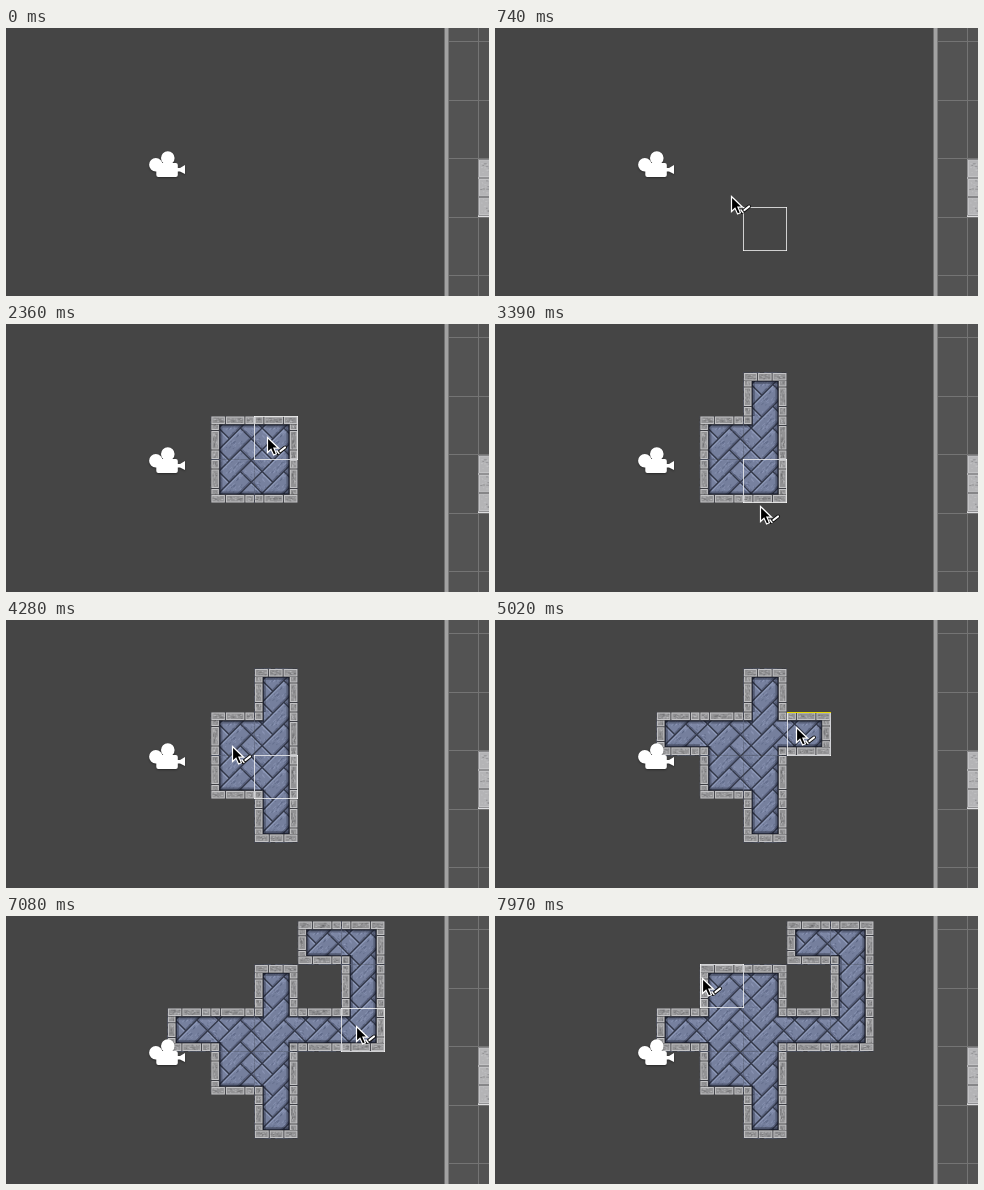
These frames come from a looping animation (483x268 px, 8 s). An HTML page with a canvas:

```html
<!DOCTYPE html>
<html lang="en">
<head>
<meta charset="utf-8">
<title>Tile painting</title>
<style>
html, body { margin: 0; width: 100%; height: 100%; overflow: hidden; background: #454545; }
canvas { display: block; width: 483px; height: 268px; }
</style>
</head>
<body>
<canvas id="stage" width="483" height="268"></canvas>
<script>
const ctx = document.getElementById('stage').getContext('2d');
const LOOP = 8000, CELL = 43.5, X0 = 161.4, Y0 = 5, WALL = 8.5;
const SIDES = [[0, -1], [1, 0], [0, 1], [-1, 0]];

// Each point: cursor x, y, then optionally the painted column, row and yellow edges.
const moves = [
  [450, 1030, [[266, 243], [250, 215], [236, 168], [228, 128], [227, 119, 1, 2]]],
  [1330, 2360, [[237, 152, 1, 3, 'lbr'], [237, 152], [254, 164], [263, 171, 2, 3], [263, 168],
    [262, 140], [261, 113, 2, 2], [261, 113]]],
  [2650, 3390, [[262, 90], [264, 74], [264, 70, 2, 1], [264, 105], [265, 160], [265, 182]]],
  [3830, 3830, [[265, 182, 2, 4]]],
  [4130, 5160, [[258, 165], [226, 126], [190, 112], [182, 111, 0, 2], [210, 110], [265, 108],
    [301, 107, 3, 2, 't'], [301, 107]]],
  [5310, 6340, [[303, 97], [300, 78], [302, 58], [308, 38], [318, 29], [330, 32],
    [326, 37, 3, 0], [326, 37]]],
  [6490, 7080, [[342, 33], [352, 32, 4, 0], [354, 67, 4, 1], [350, 108, 4, 2], [350, 110]]],
  [7380, 7970, [[318, 108], [262, 84], [224, 68], [212, 64, 1, 1], [207, 62]]]
];

const steps = moves.flatMap(([from, to, path]) => path.map(([x, y, col, row, edges = 'tb'], i) => ({
  t: from + i * (to - from) / Math.max(1, path.length - 1) - 6,
  x, y, tile: col === undefined ? null : { col, row, edges }
})));

function random(seed) {
  return () => (seed = (seed * 16807) % 2147483647) / 2147483647;
}

function rect(color, x, y, w, h) {
  ctx.fillStyle = color;
  ctx.fillRect(x, y, w, h);
}

function plank(x, y, angle, length, rnd) {
  const w = CELL / Math.SQRT2 / 2;
  ctx.save();
  ctx.translate(x, y);
  ctx.rotate(angle);
  const tone = rnd() * 14;
  rect(`rgb(${113 + tone},${123 + tone},${153 + tone})`, -length / 2 + .7, -w / 2 + .7, length - 1.4, w - 1.4);
  rect('rgba(167,178,211,.55)', -length / 2 + 1, -w / 2 + 1, length - 2, 1);
  rect('rgba(48,54,78,.4)', -length / 2 + 1, w / 2 - 2, length - 2, 1.2);
  for (let i = 0; i < length; i++) {
    rect(rnd() < .5 ? 'rgba(165,176,210,.3)' : 'rgba(65,74,105,.3)',
      (rnd() - .5) * (length - 5), (rnd() - .5) * (w - 3), 1 + rnd() * 3, 1);
  }
  ctx.restore();
}

function floor() {
  const rnd = random(77), w = CELL / Math.SQRT2 / 2;
  rect('#333849', 0, 0, CELL, CELL);
  for (let j = -1; j < 4; j++) {
    const y = 6.5 + j * CELL / 2;
    plank(24, y, -Math.PI / 4, w * 2, rnd);
    for (const x of [24 - CELL / 2, 24 + CELL / 2]) {
      for (const s of [-1, 1]) {
        const d = s * w / 2 / Math.SQRT2;
        plank(x + d, y + CELL / 4 + d, Math.PI / 4, w, rnd);
      }
    }
  }
}

function brick(x, y, w, h, rnd, base = '#929294') {
  rect('#48484a', x, y, w, h);
  rect('#c3c3c5', x + .5, y + .5, w - 1, h - 1);
  rect(base, x + 1.5, y + 1.5, w - 3, h - 3);
  for (let i = 0; i < w; i++) {
    rect(rnd() < .5 ? 'rgba(205,205,207,.4)' : 'rgba(95,95,98,.4)',
      x + 1.5 + rnd() * (w - 5), y + 1.5 + rnd() * (h - 4), 1 + rnd() * 2, 1);
  }
}

function shade(w, h) {
  rect('rgba(20,23,38,.7)', 0, 0, w, h + 1.2);
  rect('rgba(20,23,38,.3)', 0, 0, w, h + 3);
}

function wall(start, end, rnd) {
  const cuts = start && end ? [14, 28.7] : start ? [14.5, 34] : end ? [9.5, 29] : [9.5, 34];
  const marks = [0, ...cuts, CELL];
  for (let i = 0; i < 3; i++) brick(marks[i], 0, marks[i + 1] - marks[i], WALL, rnd);
}

function tile(col, row, has) {
  const rnd = random(311 + col * 71 + row * 13);
  const eachSide = draw => [1, 3, 0, 2].forEach(k => {
    const up = SIDES[k], left = SIDES[(k + 3) % 4], right = SIDES[(k + 1) % 4];
    const near = (...dirs) => has(dirs.reduce((c, d) => c + d[0], col), dirs.reduce((r, d) => r + d[1], row));
    ctx.save();
    ctx.translate(CELL / 2, CELL / 2);
    ctx.rotate(k * Math.PI / 2);
    ctx.translate(-CELL / 2, -CELL / 2);
    draw(near, up, left, right);
    ctx.restore();
  });
  ctx.save();
  ctx.translate(X0 + col * CELL, Y0 + row * CELL);
  ctx.beginPath();
  ctx.rect(0, 0, CELL + .1, CELL + .1);
  ctx.clip();
  floor();
  eachSide((near, up, left) => {
    if (!near(up)) shade(CELL, WALL);
    else if (near(left) && !near(up, left)) shade(WALL + 1, WALL);
  });
  eachSide((near, up, left, right) => {
    if (!near(up)) wall(!near(left), !near(right), rnd);
    else if (near(left) && !near(up, left)) brick(0, 0, WALL, WALL, rnd);
  });
  ctx.restore();
}

function backdrop() {
  rect('#454545', 0, 0, 483, 268);
  rect('#535353', 443, 0, 40, 268);
  for (let y = 13; y < 268; y += 58.6) rect('#747474', 443, Math.round(y), 40, 1);
  rect('#747474', 472, 0, 1, 268);
  rect('#707070', 438, 0, 1, 268);
  rect('#a2a2a2', 439, 0, 3, 268);
  rect('#7c7c7c', 442, 0, 1, 268);
  const rnd = random(9);
  rect('#dedee0', 472, 131, 11, 58);
  [131, 150.5, 169].forEach(y => brick(472.5, y, 18, 18.5, rnd, '#b4b4b6'));
}

function camera() {
  ctx.save();
  ctx.shadowColor = 'rgba(0,0,0,.4)';
  ctx.shadowBlur = 2;
  ctx.shadowOffsetY = 1;
  ctx.fillStyle = '#fff';
  ctx.beginPath();
  ctx.arc(149.8, 136.8, 6.7, 0, 7);
  ctx.closePath();
  ctx.moveTo(168.6, 130);
  ctx.arc(161.8, 130, 6.8, 0, 7);
  ctx.closePath();
  ctx.roundRect(150.3, 135, 21.5, 14, 2);
  ctx.moveTo(171, 140);
  ctx.lineTo(174, 140);
  ctx.lineTo(179, 137);
  ctx.lineTo(179, 146);
  ctx.lineTo(174, 143.5);
  ctx.lineTo(171, 143.5);
  ctx.fill();
  ctx.restore();
}

function outline(col, row, edges) {
  const x = Math.round(X0 + col * CELL - .4), y = Math.round(Y0 + row * CELL - .1);
  const color = e => edges.includes(e) ? '#e6d800' : 'rgba(255,255,255,.75)';
  rect(color('l'), x, y, 1, 44);
  rect(color('r'), x + 43, y, 1, 44);
  rect(color('t'), x, y, 44, 1);
  rect(color('b'), x, y + 43, 44, 1);
}

function line(color, width, x1, y1, x2, y2) {
  ctx.strokeStyle = color;
  ctx.lineWidth = width;
  ctx.beginPath();
  ctx.moveTo(x1, y1);
  ctx.lineTo(x2, y2);
  ctx.stroke();
}

function cursor(x, y) {
  ctx.save();
  ctx.translate(x, y);
  ctx.lineCap = 'round';
  line('#111', 4, 11, 16, 18, 10.5);
  line('#fff', 2.2, 13.5, 14, 18, 10.5);
  line('#fff', 1.4, 10, 14, 12, 16.5);
  const arrow = new Path2D('M.5 .5V15.5L4 12.2L6.6 18L9.4 16.8L6.9 11.2H11.6Z');
  ctx.fillStyle = '#000';
  ctx.strokeStyle = '#fff';
  ctx.lineWidth = 1.2;
  ctx.fill(arrow);
  ctx.stroke(arrow);
  ctx.restore();
}

function draw(index) {
  backdrop();
  const tiles = steps.slice(0, index + 1).map(s => s.tile).filter(Boolean);
  const has = (c, r) => tiles.some(p => p.col === c && p.row === r);
  tiles.forEach(p => tile(p.col, p.row, has));
  camera();
  if (index < 0) return;
  // The cell marker trails the pointer by one step.
  const now = steps[index], last = steps[Math.max(0, index - 1)];
  const cell = now.tile || {
    col: Math.floor((last.x - X0) / CELL), row: Math.floor((last.y - Y0) / CELL), edges: ''
  };
  outline(cell.col, cell.row, cell.edges);
  cursor(now.x, now.y);
}

let shown = null;
const begin = performance.now();
function tick() {
  const t = (performance.now() - begin) % LOOP;
  const index = steps.filter(s => s.t <= t).length - 1;
  if (index !== shown) draw(shown = index);
  requestAnimationFrame(tick);
}
tick();
</script>
</body>
</html>
```
